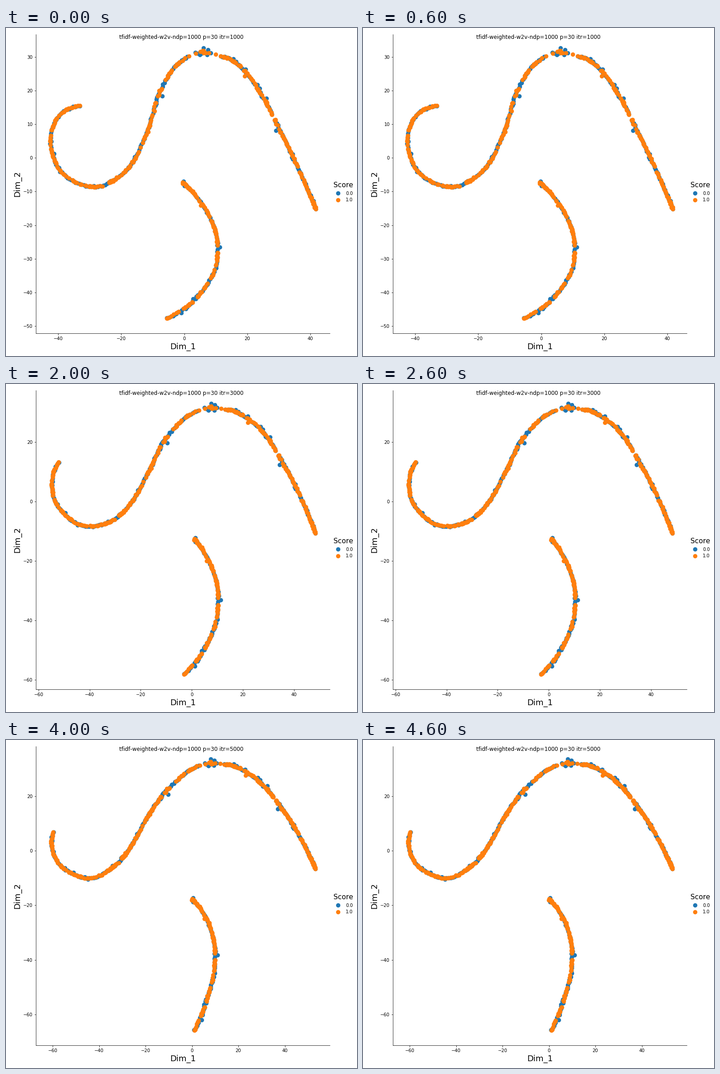
A matplotlib script for the animation above (5000 ms loop, 775 by 723 pixels).

```python
import numpy as np
import matplotlib.pyplot as plt
from matplotlib.animation import FuncAnimation

W, H, DPI = 775, 723, 72
LEFT, RIGHT, TOP, BOTTOM = 66, 715, 14, 673
BLUE, ORANGE = "#1f77b4", "#ff7f0e"
FRAMES = 5

plt.rcParams.update({"font.family": "DejaVu Sans", "font.size": 10,
                     "text.kerning_factor": 6})
rng = np.random.default_rng(5)

# Pixel origin and pixels per unit of each view: x0, y0, kx, ky.
VIEWS = [(393.7, 286.2, 6.962, 7.42), (407.2, 268.7, 6.106, 6.862),
         (410.1, 258.8, 5.635, 6.55), (411, 250.5, 5.375, 6.275),
         (410.5, 244, 5.125, 6.016)]


def progress(k):
    """Training slows down: big steps first, small ones later."""
    return (k / (FRAMES - 1)) ** 0.43


class Strand:
    """A smooth curve that bends from a first through a middle to a last pose."""

    def __init__(self, first, middle, last):
        self.keys = np.array([first, middle, last], float)
        steps = np.hypot(*np.diff(self.keys[0], axis=0).T)
        self.knots = np.concatenate([[0], np.cumsum(steps)])

    def pose(self, k):
        p, m = progress(k), progress((FRAMES - 1) / 2)
        weights = [(p - m) * (p - 1) / m, p * (p - 1) / (m * (m - 1)),
                   p * (p - m) / (1 - m)]
        return np.tensordot(weights, self.keys, 1)

    def point(self, k, t):
        p, s = self.pose(k), self.knots
        m = np.gradient(p, s, axis=0, edge_order=2)
        i = np.clip(np.searchsorted(s, t, "right") - 1, 0, len(s) - 2)
        h = (s[i + 1] - s[i])[:, None]
        u = (t - s[i])[:, None] / h
        return ((1 + 2 * u) * (1 - u) ** 2 * p[i] + u * (1 - u) ** 2 * h * m[i]
                + u ** 2 * (3 - 2 * u) * p[i + 1] + u ** 2 * (u - 1) * h * m[i + 1])

    def normal(self, k, t):
        d = self.point(k, t + 0.5) - self.point(k, t - 0.5)
        d /= np.hypot(d[:, 0], d[:, 1])[:, None]
        return np.column_stack([-d[:, 1], d[:, 0]])

    def place(self, k, t, off):
        return self.point(k, t) + off[:, None] * self.normal(k, t)

    def locate(self, spots):
        """Parameter and sideways offset of dots given in the first pose."""
        spots = np.array(spots, float)
        grid = np.linspace(0, self.knots[-1], 3000)
        gap = spots[:, None] - self.point(0, grid)[None]
        t = grid[np.argmin((gap ** 2).sum(2), axis=1)]
        return t, ((spots - self.point(0, t)) * self.normal(0, t)).sum(1)


wave = Strand(
    [(163, 171), (117, 192), (98, 245), (125, 320), (201, 350), (262, 317),
     (308, 238), (342, 136), (374, 84), (427, 54), (463, 58), (500, 72),
     (563, 145), (598, 212), (684, 399)],
    [(116, 172), (101, 212), (110, 262), (164, 310), (231, 303), (273, 266),
     (315, 193), (355, 117), (397, 73), (446, 53), (475, 54), (506, 61),
     (571, 110), (606, 165), (683, 329)],
    [(104, 203), (102, 244), (125, 281), (186, 304), (241, 276), (274, 237),
     (312, 170), (359, 107), (403, 68), (446, 52), (473, 52), (502, 57),
     (565, 97), (601, 140), (683, 284)])
arc = Strand(
    [(390, 340), (434, 390), (464, 455), (463, 525), (425, 589), (355, 640)],
    [(416, 341), (447, 389), (467, 449), (465, 516), (441, 578), (393, 640)],
    [(411, 350), (442, 393), (460, 450), (459, 511), (443, 572), (416, 640)])


def blue_run(lo, hi, spread):
    """An even chain with a few dots straying from the line."""
    t = np.arange(lo, hi, 4.5)
    return t, np.clip(spread * rng.standard_t(3, len(t)), -5, 5)


def orange_run(lo, hi, spread):
    """Random spacing, so now and then a gap shows the blue below."""
    t = lo + np.cumsum(rng.exponential(3.1, int(hi - lo)))
    t = np.concatenate([[lo], t[t < hi], [hi]])
    return t, rng.normal(0, spread, len(t))


def populate(strand, runs, blue, orange):
    """Blue and orange dots as (t, offset) pairs for each colour."""
    layers = []
    for make, strays in ((blue_run, blue), (orange_run, orange)):
        parts = [strand.locate(strays)]
        for a, b, spread in runs:
            (lo, hi), _ = strand.locate([a, b])
            parts.append(make(lo, hi, spread))
        layers.append(np.hstack(parts))
    return layers


groups = [
    (wave, populate(
        wave,
        [((163, 171), (404, 62), 0.7), ((419, 57), (448, 54), 1.8),
         ((474, 62), (587, 191), 0.8), ((593, 203), (684, 399), 0.7)],
        blue=[(345, 150), (436, 44), (446, 48), (452, 55), (502, 68), (596, 226)],
        orange=[(463, 58), (527, 106), (338, 138)])),
    (arc, populate(
        arc, [((390, 340), (355, 640), 0.7)],
        blue=[(394, 348), (422, 592)], orange=[(390, 343), (430, 391)])),
]


def dots(k, layer):
    return np.vstack([s.place(k, *layers[layer]) for s, layers in groups])


fig = plt.figure(figsize=(W / DPI, H / DPI), dpi=DPI, facecolor="white")
ax = fig.add_axes([LEFT / W, 1 - BOTTOM / H, (RIGHT - LEFT) / W, (BOTTOM - TOP) / H])
ax.spines[["top", "right"]].set_visible(False)
ax.set_xlabel("Dim_1", fontsize=18)
ax.set_ylabel("Dim_2", fontsize=18)
title = fig.suptitle("", fontsize=12)


def dot_layer(x, y, color, z):
    return ax.scatter(x, y, s=64, c=color, edgecolors=color, linewidths=1.5,
                      clip_on=False, zorder=z)


clouds = [dot_layer([], [], BLUE, 3), dot_layer([], [], ORANGE, 4)]

fig.text(723 / W, 1 - 351 / H, "Score", fontsize=15.3)
for y, color, label in ((364, BLUE, "0.0"), (379, ORANGE, "1.0")):
    dot_layer([732.7], [y], color, 3)
    fig.text(750 / W, 1 - (y + 3.5) / H, label)


def set_ticks(axis, origin, scale, lo, hi):
    step = 10 if abs(scale) > 7 else 20
    values = [v for v in range(-60, 61, step) if lo <= origin + scale * v <= hi]
    axis.set_ticks([origin + scale * v for v in values],
                   [str(v).replace("-", "\u2212") for v in values])


def update(k):
    x0, y0, kx, ky = VIEWS[k]
    set_ticks(ax.xaxis, x0, kx, LEFT, RIGHT)
    set_ticks(ax.yaxis, y0, -ky, TOP, BOTTOM)
    ax.set_xlim(LEFT, RIGHT)
    ax.set_ylim(BOTTOM, TOP)
    for i, cloud in enumerate(clouds):
        cloud.set_offsets(dots(k, i))
    title.set_text(f"tfidf-weighted-w2v-ndp=1000 p=30 itr={1000 * (k + 1)}")
    return [*clouds, title]


anim = FuncAnimation(fig, update, frames=FRAMES, interval=1000,
                     repeat=True, repeat_delay=0, blit=False)
plt.show()
```
